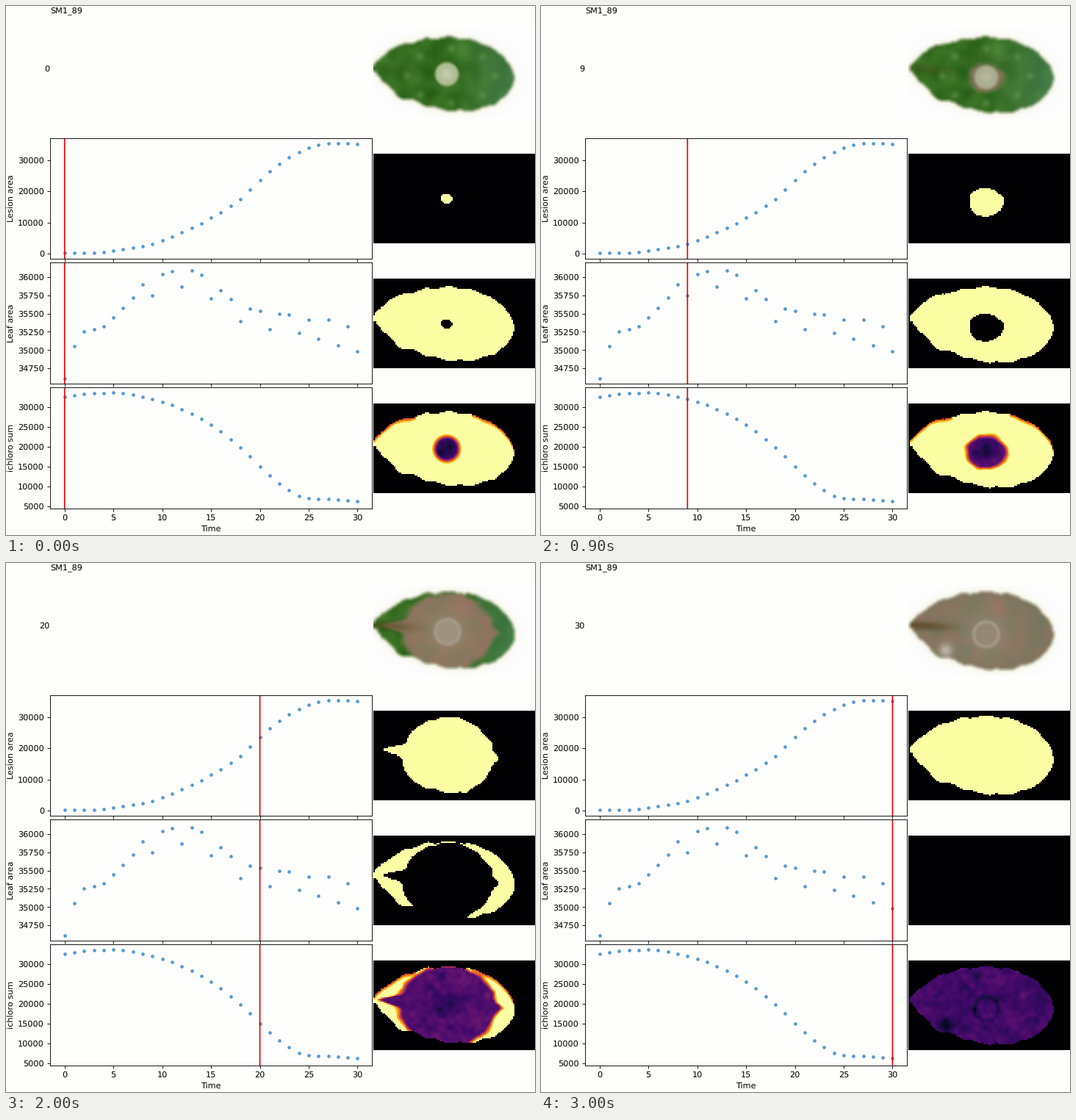
These frames come from a looping animation (720x720 px, 3100 ms). A matplotlib script:

```python
import numpy as np
import matplotlib.pyplot as plt
from matplotlib.animation import FuncAnimation

SIZE, DPI, STEPS = 720, 80, 31
PAGE = "#fefefc"
COLS, ROWS, CELL = 110, 61, 2
TIMES = np.arange(STEPS)

X, Y = np.meshgrid(np.arange(COLS) * CELL + 1.0, np.arange(ROWS) * CELL + 1.0)


def curve(t, keys, values):
    """Smooth cubic through a few key points."""
    keys, values = np.array(keys, float), np.array(values, float)
    slope = np.gradient(values, keys)
    i = np.clip(np.searchsorted(keys, t, "right") - 1, 0, len(keys) - 2)
    h = keys[i + 1] - keys[i]
    f = (t - keys[i]) / h
    blend = f * f * (3 - 2 * f)
    return (values[i] * (1 - blend) + values[i + 1] * blend
            + h * f * (1 - f) * ((1 - f) * slope[i] - f * slope[i + 1]))


def ramp(t, start, end, a=0.0, b=1.0):
    """Move linearly from a to b (numbers or colours) between two times."""
    a, b = np.asarray(a, float), np.asarray(b, float)
    return a + (b - a) * np.clip((t - start) / (end - start), 0, 1)


def bell(d, width):
    return np.exp(-(d / width) ** 2)


# measurements: smooth trends, the leaf area with a regular wobble
EVERY_3 = range(0, STEPS, 3)
lesion_area = 100 * curve(
    TIMES, EVERY_3, [3, 3, 15, 32, 67.5, 114.5, 175.5, 264.5, 326, 353, 350.5])
chloro_sum = 100 * curve(
    TIMES, EVERY_3, [325, 334, 334, 320, 294.5, 255.5, 198, 128, 76.5, 67.5, 63])
leaf_trend = curve(TIMES, [0, 1, 4, 8, 13, 18, 24, 30],
                   [34612, 35049, 35320, 35820, 36010, 35540, 35380, 35130])
wobble = np.cos(2 * np.pi * TIMES / np.where(TIMES < 26, 3, 2))
leaf_area = leaf_trend - 150 * wobble * (TIMES >= 8)


def blur(a, n):
    """Box blur over (2n + 1) cells in both directions."""
    for axis in (0, 1):
        pad = [(n, n) if k == axis else (0, 0) for k in (0, 1)]
        p = np.pad(a.astype(float), pad, mode="edge")
        size = a.shape[axis]
        a = sum(np.take(p, range(k, k + size), axis) for k in range(2 * n + 1)) / (2 * n + 1)
    return a


def soft_noise(seed, n):
    a = blur(blur(np.random.default_rng(seed).normal(size=(ROWS, COLS)), n), n)
    return a / a.std()


FINE, COARSE = soft_noise(4, 1), soft_noise(9, 3)


def drift(t):
    """Sideways shift of the leaf in the camera view."""
    return np.interp(t, [0, 7, 16, 20, 26], [-6, 0, 0, -5, 0])


def distance(x, y):
    return np.hypot(X - x, Y - y)


def centre(t):
    return 106 + drift(t), 66 + 0.7 * drift(t)


def taper(s):
    return s ** 0.75 * (1 - s) ** 0.55


def leaf_shape(t):
    """Leaf mask, position along the midrib, midrib height and upper edge."""
    left, tip = 2 + 0.4 * drift(t), 197.5 + drift(t)
    s = (X - left) / (tip - left)
    inside = (s >= 0) & (s <= 1)
    s = np.clip(s, 0, 1)
    half = taper(s) / taper(0.577)
    lobes = 1.2 * np.sin(38 * s) * half + 0.4 * FINE
    midrib = 53 + 13 * s
    shoulder = ramp(t, 12, 16, 4.5, 0) * bell(s - 0.14, 0.06)
    up = ramp(t, 10, 16, 48.5, 52) * half + shoulder + lobes
    down = (53.5 + 0.4 * drift(t)) * half + 6 * bell(s - 0.19, 0.07) + lobes
    top = midrib - np.maximum(up, 4)
    inside &= (Y > top) & (Y < midrib + np.maximum(down, 5))
    return inside, s, midrib, top


def lesion_depth(t, midrib):
    """Distance inside the lesion border, negative outside."""
    x, y = centre(t)
    radius = np.sqrt(lesion_area[t] * 0.42 / np.pi) + 10 * max(t - 26, 0)
    spike = np.interp(t, [12, 16, 20, 26], [2, 6, 24, 60])
    along = spike * bell(Y - midrib, 6) * np.where(X < x, 1, 0.35)
    rough = (1.4 * COARSE + 0.7 * FINE) * min(1, radius / 30)
    return radius - np.hypot((X - x) / 1.1, (Y - y) / 0.92) + along + rough


def heat_map(t, leaf, s, top, depth):
    r = distance(*centre(t))
    sick = np.clip(np.maximum(depth + 4, 17 - r) / 7 + 0.5, 0, 1)
    rim = np.clip(1 - (Y - top) / 5, 0, 1) * ((s < 0.3) | (s > 0.7))
    bright = (1 - 0.45 * rim) * ramp(t, 20, 30, 1, 0.35)
    dull = (ramp(t, 16, 30, 0.25, 0.2) + 0.02 * FINE + 0.015 * COARSE
            - ramp(t, 16, 26, 0.15, 0) * bell(r, 14)
            - ramp(t, 16, 26, 0, 0.07) * bell(r - 16, 3)
            - ramp(t, 26, 30, 0, 0.15) * bell(distance(51, 87), 10))
    value = bright + (dull - bright) * sick
    return np.where(leaf, np.clip(value, 0.03, 1), 0)


def paint(img, rgb, alpha):
    return img + (np.asarray(rgb, float) - img) * np.clip(alpha, 0, 1)[..., None]


def leaf_picture(t, leaf, midrib, depth):
    page = np.full((ROWS, COLS, 3), 253.0)
    page = paint(page, (238, 237, 204), 1.1 * blur(blur(leaf, 3), 3))

    body = ramp(t, 20, 30, (52, 108, 32), (118, 108, 82)) + COARSE[..., None] * (7, 7, 5)
    body = paint(body, (82, 136, 98), 0.6 * np.clip((X - 110) / 80, 0, 1) * ramp(t, 20, 28, 1, 0))
    for a in np.linspace(0, 2 * np.pi, 8, endpoint=False):
        spot = distance(106 + 60 * np.cos(a), 64 + 37 * np.sin(a))
        body = paint(body, (112, 156, 92), ramp(t, 10, 22, 0.5, 0) * bell(spot, 5))

    r = distance(*centre(t))
    sick_rgb = ramp(t, 20, 30, (136, 116, 92), (130, 117, 96)) + COARSE[..., None] * (6, -1, 1)
    body = paint(body, sick_rgb, np.clip(depth / 9 + 0.5, 0, 1))
    body = paint(body, (160, 142, 122), 0.5 * bell(r, 34) * ramp(t, 8, 16))
    body = paint(body, (84, 66, 26), bell(Y - midrib, 6) * np.clip((75 - X) / 45, 0, 1)
                 * ramp(t, 0, 30, 0.1, 0.7))

    disc_rgb = ramp(t, 0, 20, (174, 188, 146), (162, 152, 134))
    body = paint(body, disc_rgb, np.clip((18 - r) / 4, 0, 1) * ramp(t, 16, 28, 1, 0.3))
    body = paint(body, (222, 222, 200), ramp(t, 0, 20, 0.5, 0) * bell(r, 8))
    body = paint(body, (178, 170, 156), ramp(t, 16, 20, 0, 0.6) * bell(r - 17, 2.5))
    body = paint(body, (206, 196, 184), ramp(t, 26, 30, 0, 0.8) * bell(distance(51, 88), 9))

    soft = blur(leaf, 1)
    body = paint(body, (84, 92, 66), 0.5 * (1 - soft))
    return np.clip(paint(page, body, soft), 0, 255) / 255


def panels(t):
    leaf, s, midrib, top = leaf_shape(t)
    depth = lesion_depth(t, midrib)
    lesion = leaf & (depth > 0)
    return (leaf_picture(t, leaf, midrib, depth), lesion, leaf & ~lesion,
            heat_map(t, leaf, s, top, depth))


plt.rcParams.update({"font.size": 10.1, "text.hinting": "none"})
fig = plt.figure(figsize=(SIZE / DPI, SIZE / DPI), dpi=DPI, facecolor=PAGE)

LEFT, WIDTH, HEIGHT = 59.8, 438.6, 164.8
TOP, PITCH = 9.8, 169.8


def add_axes(x, y, w, h, **kw):
    """Axes placed in pixels from the top left."""
    return fig.add_axes([x / SIZE, 1 - (y + h) / SIZE, w / SIZE, h / SIZE], **kw)


fig.text(LEFT / SIZE, 1 - 9 / SIZE, "SM1_89")
counter = fig.text(LEFT / SIZE, 1 - 89 / SIZE, "0", ha="right")

lines = []
series = [("Lesion area", lesion_area, (-1712, 37062)),
          ("Leaf area", leaf_area, (34537, 36196)),
          ("ichloro sum", chloro_sum, (4415, 34885))]
for k, (name, data, limits) in enumerate(series, 1):
    ax = add_axes(LEFT, TOP + PITCH * k, WIDTH, HEIGHT, facecolor=PAGE)
    ax.scatter(TIMES, data, s=11, color="#5799d0", linewidths=0.8)
    lines.append(ax.axvline(0, color="#e60000", lw=1.5, snap=False))
    ax.set(xlim=(-1.5, 31.5), ylim=limits, ylabel=name)
    ax.tick_params(labelbottom=k == len(series))
ax.set_xlabel("Time")

images = []
for k, picture in enumerate(panels(0)):
    ax = add_axes(499.7, TOP + PITCH * k + HEIGHT / 2 - 61, 219.3, 122)
    ax.axis("off")
    images.append(ax.imshow(picture, cmap="inferno", vmin=0, vmax=1, aspect="auto",
                            interpolation="nearest" if k else "bilinear"))


def update(t):
    counter.set_text(str(t))
    for line in lines:
        line.set_xdata([t, t])
    for image, picture in zip(images, panels(t)):
        image.set_data(picture)
    return [counter, *lines, *images]


anim = FuncAnimation(fig, update, frames=STEPS, interval=100, repeat=True)
plt.show()
```
